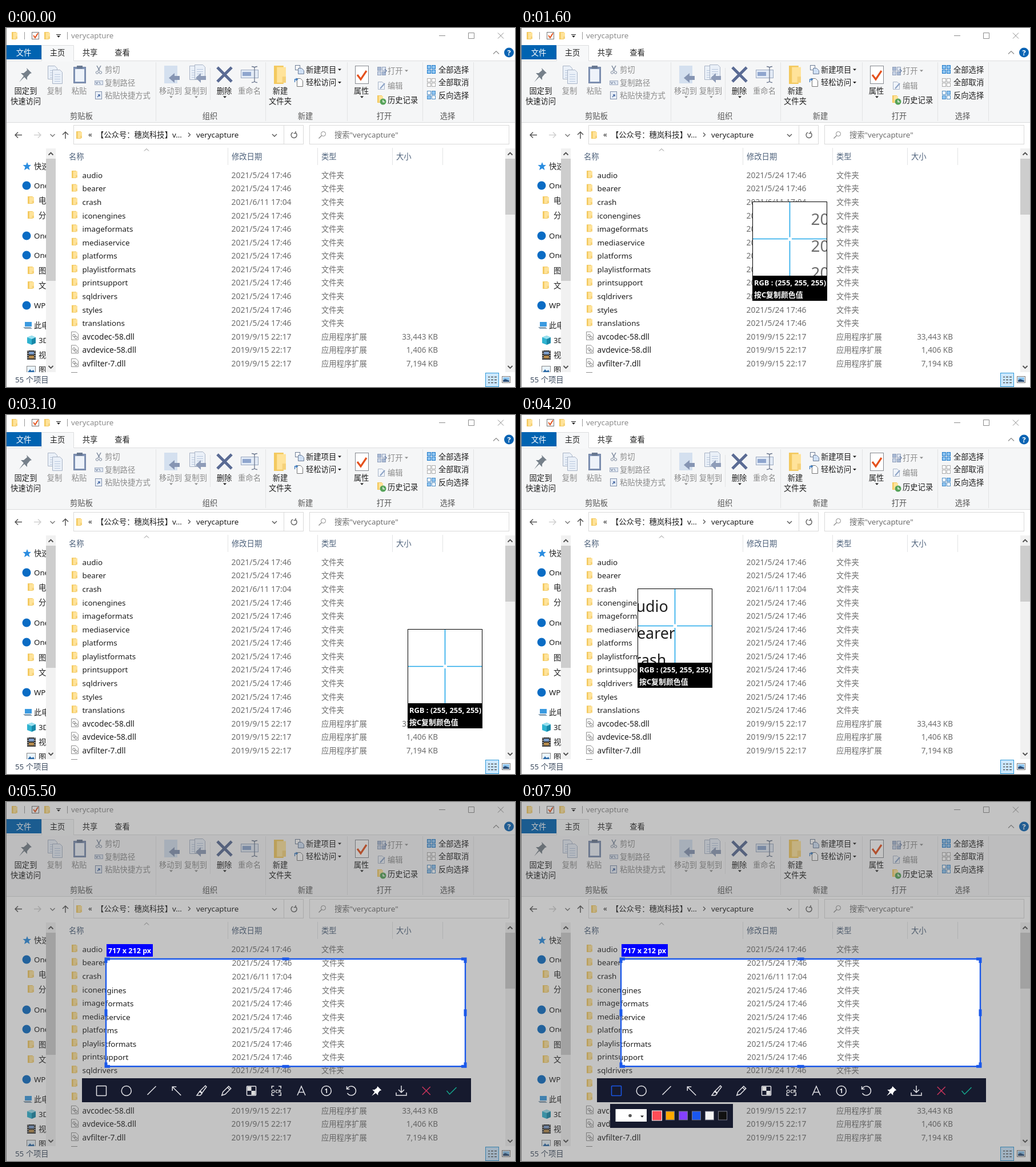
An HTML page that plays this animation: 891x629 px, repeating every 8000 ms.

```html
<!DOCTYPE html>
<html lang="zh-CN">
<head>
<meta charset="utf-8">
<style>
html, body { margin: 0; width: 100%; height: 100%; overflow: hidden; background: #fff; }
#stage { display: block; width: 891px; height: 629px; }
text { font: 13.3px "Noto Sans", "Noto Sans CJK SC", "Noto Sans CJK", sans-serif; white-space: pre; }
.b { font-weight: 700; }
.off { display: none; }
</style>
</head>
<body>
<svg id="stage" viewBox="0 0 891 629" xmlns="http://www.w3.org/2000/svg"></svg>
<script>
const INK = '#1e1e1e', GREY = '#8c8c8c', MID = '#6d6d6d', STEEL = '#5a6b94', BLUE = '#1a58ea', NAVY = '#161a2e';

// Drawing helpers; text is placed by its vertical centre.
const text = (x, y, s, fill = INK, anchor = 'start', size = 13.3, cls = '') =>
  `<text x="${x}" y="${y + 4.8}" fill="${fill}" text-anchor="${anchor}" style="font-size:${size}px" class="${cls}">${s}</text>`;
const mid = (x, y, s, fill) => text(x, y, s, fill, 'middle');
const rect = (x, y, w, h, fill, stroke = 'none') =>
  `<rect x="${x}" y="${y}" width="${w}" height="${h}" fill="${fill}" stroke="${stroke}"/>`;
const line = (d, stroke = GREY, w = 1, fill = 'none') =>
  `<path d="${d}" stroke="${stroke}" stroke-width="${w}" fill="${fill}"/>`;
const shape = (d, fill) => `<path d="${d}" fill="${fill}"/>`;
const disc = (x, y, r, fill, stroke = 'none') =>
  `<circle cx="${x}" cy="${y}" r="${r}" fill="${fill}" stroke="${stroke}"/>`;
const caret = (x, y, fill = INK) => shape(`M${x - 3} ${y - 1.5}h6l-3 3.2z`, fill);
const chevron = (x, y, dir, stroke = '#555', w = 1.4) =>
  line(`M${x - 4} ${y - 2 * dir}l4 ${4 * dir}l4 ${-4 * dir}`, stroke, w);
const vline = (x, y1, y2, c = '#e2e3e4') => line(`M${x + .5} ${y1}V${y2}`, c);
const folder = (x, y, w = 10, h = 13) =>
  rect(x, y, w * .8, h, '#f3c95f') + rect(x + w * .25, y + h * .08, w * .75, h * .85, '#ffe39a') +
  rect(x + w * .7, y + h * .6, w * .3, h * .33, '#f6d27a');
const page = (x, y, w, h, fill = '#fff', stroke = '#a9b4c6') =>
  line(`M${x + .5} ${y + .5}h${w - 5}l4 4v${h - 5}h${1 - w}z`, stroke, 1, fill);
const sheet = (x, y, w, h) => page(x, y, w, h, '#eaf0f8') +
  [0, 1, 2, 3].map(i => line(`M${x + 4} ${y + 8.5 + i * 4}h${w - 8}`, '#b9c8de')).join('');
const tiles = (x, y, fills, stroke) =>
  fills.map((f, i) => rect(x + (i % 2) * 8 + .5, y + (i >> 1) * 8 + .5, 6, 6, f, stroke)).join('');

function titleBar() {
  return folder(10, 7) + vline(32, 7, 20, '#999') +
    rect(45.5, 7.5, 12, 12, '#fff', '#777') + line('M48 13l3 4l5-8', '#e2531f', 2) +
    folder(67, 7) + line('M88 11.5h8', INK) + caret(92, 15) + vline(107, 7, 20, '#999') +
    text(114, 13.5, 'verycapture', GREY) +
    line('M758 13.5h11M809.5 8.5h10v10h-10zM861 8.500l10 10m0-10l-10 10');
}

function tabs() {
  return rect(1, 57, 890, 108, '#f5f6f7') + line('M0 57.500H62.500V30.500H118.500V57.500H891', '#dcdddf') +
    rect(63, 31, 55, 28, '#f7f8f9') + line('M0 165.500H891', '#dadbdc') +
    rect(0, 30, 62, 25, '#0063b1') + mid(31, 43, '文件', '#fff') +
    mid(90, 43, '主页') + mid(147, 43, '共享') + mid(203.500, 43, '查看') +
    line('M853 45.500l5-5l5 5', GREY, 1.2) + disc(880.500, 43, 8.500, '#0a64b4') +
    text(880.500, 43, '?', '#fff', 'middle', 13, 'b');
}

function ribbon() {
  let s = [262, 454, 597, 729, 818].map(x => vline(x, 60, 163)).join('') + vline(357, 70, 126);
  for (const [x, n] of [[132, '剪贴板'], [357, '组织'], [524, '新建'], [662, '打开'], [773, '选择']])
    s += mid(x, 154, n, '#555');
  for (const [x, y, n, c] of [
    [34.500, 110, '固定到'], [34.500, 128, '快速访问'], [85, 110, '复制', GREY], [128, 110, '粘贴', GREY],
    [288, 110, '移动到', GREY], [332, 110, '复制到', GREY], [382, 110, '删除'], [426, 110, '重命名', GREY],
    [480, 110, '新建'], [480, 128, '文件夹'], [622, 110, '属性']]) s += mid(x, y, n, c);
  for (const [x, y, n, c] of [
    [173, 73, '剪切', GREY], [173, 96, '复制路径', GREY], [173, 118, '粘贴快捷方式', GREY],
    [525, 73, '新建项目'], [525, 95.500, '轻松访问'], [668, 75, '打开', GREY], [668, 101, '编辑', GREY],
    [668, 126, '历史记录'], [757, 73, '全部选择'], [757, 95.500, '全部取消'], [757, 118, '反向选择']])
    s += text(x, y, n, c);
  for (const [x, y, c] of [[289, 121, GREY], [333, 121, GREY], [383, 121], [623, 121], [584, 73], [584, 95.500], [701, 75, GREY]])
    s += caret(x, y, c);
  // clipboard group
  s += shape('M36 70l9 9l-3 1l-5 6v5l-5-5l-9 9l8-11l-5-5h5l6-5z', '#76808a');
  s += sheet(73, 66, 17, 24) + sheet(81, 73, 18, 25);
  s += rect(118.500, 68.500, 21, 28, '#8093b5', '#7182a3') + rect(121, 72, 16, 22, '#eef3fa') + rect(124, 66, 10, 5, '#687891');
  s += line('M159 66l5 9M166 66l-5 9', '#7b889d', 1.500) + disc(159.500, 78, 2.200, 'none', '#7b889d') + disc(165.500, 78, 2.200, 'none', '#7b889d');
  s += rect(155.500, 92.500, 14, 7, '#dfe7f2', '#9fabc0') + line('M157 94l2 4l2-4M163 94l2 4', '#6d7c97');
  s += rect(156.500, 111.500, 11, 13, '#e8eef7', '#7f8fab') + line('M160 121l4-4m-3 0h3v3', '#4e6fa8', 1.500);
  // organise group
  s += rect(277, 66, 23, 31, '#d4e0ef') + shape('M304 84v7h-9v5l-10-8.500l10-8.500v5z', '#8695b3');
  s += sheet(321, 66, 18, 25) + sheet(330, 64, 19, 26) + shape('M350 84v7h-9v5l-9-8.500l9-8.500v5z', '#8e9cb8');
  s += line('M370 69l25 25m0-25l-25 25', STEEL, 5);
  s += rect(411.500, 73.500, 30, 14, '#e3ebf6', '#9aa8c0') + rect(414, 77, 15, 7, '#8fa6ce') + line('M430 67.500q4 0 5 2q1-2 5-2m-5 2v24m-5 2q4 0 5-2q1 2 5 2', '#707c92', 1.300);
  // new group
  s += folder(469, 66, 21, 32);
  s += rect(506.500, 65.500, 8, 8, '#fff', '#6d7d96') + page(511, 70, 11, 11, '#cfe0f5', '#6d7d96');
  s += page(509, 88, 11, 15, '#fff', '#777') + line('M505.500 95v-5h5m-3-2l3 2l-3 2', '#3b79bd', 1.300);
  // open group
  s += rect(611.500, 66.500, 23, 31, '#fff', '#85898f') + line('M615 82l6 8l10-15', '#e5511d', 3.200);
  s += tiles(650, 68, ['#a8b9d4', '#dfe7f2', '#c8d4e6', '#a8b9d4'], '#92a1bc') + line('M663 72l3 3l-3 3', '#6e83a8', 1.500);
  s += page(651, 94, 12, 14, '#f0f4fa') + line('M655 106l8-9', '#8ba2c5', 2);
  s += folder(650, 118, 10, 13) + disc(660, 129, 5.500, '#57a35a') + line('M660 126v3.500h3', '#fff', 1.300);
  // select group
  s += tiles(737, 65, Array(4).fill('#8ec5f2'), '#1e78c8') + tiles(737, 88, Array(4).fill('#fff'), '#aaa') +
    tiles(737, 110, ['#fff', '#8ec5f2', '#8ec5f2', '#fff'], '#4b8cc4');
  return s;
}

function addressBar() {
  return line('M28 187.500H16m5-5l-5 5l5 5', '#555', 1.500) + line('M49 187.500H61m-5-5l5 5l-5 5', '#d0d0d0', 1.500) +
    chevron(81.500, 188, 1, '#777') + line('M104 194V182m-5 5l5-5l5 5', '#555', 1.500) +
    rect(118.500, 170.500, 402, 33, '#fff', '#d9d9d9') + vline(486, 171, 203, '#d9d9d9') +
    folder(123, 181) + text(144, 186, '«') + text(158, 187.500, '【公众号：穗岚科技】v...') +
    line('M319 183.500l3.500 3.500l-3.500 3.500', '#555', 1.300) + text(333, 187.500, 'verycapture') +
    chevron(470, 188, 1) + line('M507 183.500a5 5 0 1 1-5-.5m5-2v3.500h-3.500', '#666', 1.500) +
    rect(531.500, 170.500, 349, 33, '#fff', '#d9d9d9') + disc(555.500, 185.500, 4, 'none', '#888') + line('M552.500 188.500l-5 5', '#888', 1.300) +
    text(575, 187.500, '搜索"verycapture"', MID);
}

function sideBar() {
  const cloud = y => disc(36, y, 7.500, '#0a6cc4');
  const dir = y => folder(38, y - 7, 11, 13);
  const pic = y => rect(36.500, y - 6.500, 15, 12, '#eaf4fb', '#888') + shape(`M38 ${y + 4}l4-5l3 3l3-2l2 4z`, '#2f6ca8');
  const star = y => shape(`M37 ${y - 7}l2 5h5l-4 3.500l1.500 5.500l-4.500-3l-5 3l1.500-5.500l-4-3.500h5.500z`, '#2b8de0');
  const monitor = y => rect(33, y - 6, 12, 8, '#3a9ae0') + shape(`M30 ${y + 3}h13l3 3h-13z`, '#8aa1b3');
  const cube = y => shape(`M37 ${y - 5}l8-3l7 3v10l-7 3l-8-3z`, '#2fb3d0') + shape(`M45 ${y - 2}l7-3v10l-7 3z`, '#1788a8') + shape(`M37 ${y - 5}l8-3l7 3l-7 3z`, '#9be0ef');
  const film = y => rect(37, y - 8, 15, 16, '#333') + rect(40, y - 6, 9, 5, '#7a9bc8') + rect(40, y + 1, 9, 5, '#b58a4c') +
    line(`M38.500 ${y - 8}v16M50.500 ${y - 8}v16`, '#ddd', 1.200).replace('/>', ' stroke-dasharray="2 2"/>');
  const items = [[242, star, 49, '快速访问'], [276, cloud, 49, 'One'], [302, dir, 57, '电'], [328, dir, 57, '分'],
    [364, cloud, 49, 'One'], [398, cloud, 49, 'One'], [425, dir, 57, '图'], [451, dir, 57, '文'],
    [486, cloud, 49, 'WP'], [521, monitor, 49, '此电脑'], [547, cube, 57, '3D'], [573, film, 57, '视'], [599, pic, 57, '图']];
  return `<svg width="70" height="603">${items.map(([y, icon, x, n]) => icon(y) + text(x, y, n)).join('')}</svg>`;
}

const scrollBar = (x, thumb) => rect(x, 211, 17, 392, '#f1f1f1') + rect(x, 229, 17, thumb, '#cdcdcd') +
  chevron(x + 8.500, 220.500, -1, '#505050', 1.800) + chevron(x + 8.500, 594, 1, '#505050', 1.800);

function fileList() {
  let s = [388, 545, 676, 764].map(x => vline(x, 210, 240)).join('') + line('M242 215.500l4-4l4 4', '#888');
  for (const [x, n] of [[110, '名称'], [395, '修改日期'], [552, '类型'], [683, '大小']]) s += text(x, 225, n, '#4c607a');
  const dirs = 'audio bearer crash iconengines imageformats mediaservice platforms playlistformats printsupport sqldrivers styles translations'.split(' ');
  const dlls = [['avcodec-58.dll', '33,443 KB'], ['avdevice-58.dll', '1,406 KB'], ['avfilter-7.dll', '7,194 KB']];
  const row = i => 258 + i * 23.570;
  const date = (y, d) => text(394.500, y, d, MID, 'start', 13.9);
  dirs.forEach((n, i) => {
    const y = row(i);
    s += folder(115, y - 8) + text(133.500, y, n, INK, 'start', 13.4) +
      date(y, n === 'crash' ? '2021/6/11 17:04' : '2021/5/24 17:46') + text(552, y, '文件夹', MID);
  });
  dlls.forEach(([n, size], i) => {
    const y = row(dirs.length + i);
    s += page(114, y - 9, 13, 15, '#fff', '#8f8f8f') + disc(119, y - 2, 2.200, 'none', '#777') + disc(122.500, y + 1.500, 2.200, 'none', '#777') +
      text(133.500, y, n, INK, 'start', 13.7) + date(y, '2019/9/15 22:17') +
      text(552, y, '应用程序扩展', MID) + text(756, y, size, MID, 'end', 13.5);
  });
  return s + line('M114 603.500h11', '#8f8f8f');
}

function statusBar() {
  return text(16, 616, '55 个项目', '#3b4a5e') + rect(839.500, 604.500, 23, 24, '#cce8ff', '#2f9ad8') +
    [611, 616, 621].map(y => line(`M844 ${y + .5}h3m2 0h4m2 0h4`, '#555', 1.500)).join('') +
    rect(868.500, 610.500, 14, 11, '#fff', '#777') + rect(870, 612, 11, 8, '#8cc4ee') + shape('M870 620v-3l4-2l7 3v2z', '#2d4f78');
}

const toolIcons = [
  '<rect id="box" x="-8.500" y="-8.500" width="17" height="17" rx="1"/>', '<circle r="8.500"/>', '<path d="M-7 7L8-8"/>',
  '<path d="M8 8L-7-7m0 7v-7h7"/>', '<path d="M-8 8h6l3-3l-4-4zM-2 0l3 4l8-11l-2-2z"/>',
  '<path d="M-8 8l2-6l10-10l4 4l-10 10zM2-6l4 4"/>',
  '<rect x="-8" y="-8" width="16" height="16" rx="1"/><path d="M-7-7h7v7h-7zM0 0h7v7h-7z" fill="#ddd" stroke="none"/>',
  '<path d="M-8-4v-4h4M4-8h4v4M8 4v4h-4M-4 8h-4v-4"/><text y="3.500" text-anchor="middle" class="b" style="font-size:8.500px" fill="#ddd" stroke="none">OCR</text>',
  '<path d="M-7 8L0-8L7 8M-4.500 2.500h9"/>',
  '<circle r="8.500"/><text y="4" text-anchor="middle" class="b" style="font-size:11px" fill="#eee" stroke="none">1</text>',
  '<path d="M-7-4a8 8 0 1 1 0 8M-8-8v5h5"/>', '<path d="M2-8l7 7l-3 1l-3 4v4l-4-4l-7 5l5-7l-4-4h4l4-3z" fill="#fff" stroke="none"/>',
  '<path d="M0-9V3m-5-5l5 5l5-5M-9 3v5h18v-5"/>', '<path d="M-7-7l14 14m0-14l-14 14" stroke="#c9345c"/>',
  '<path d="M-8 0l5 6L9-6" stroke="#15a58c"/>'];

const toolBar = () => rect(133, 484, 681, 42, NAVY) + '<g fill="none" stroke="#e4e4e8" stroke-width="1.5">' +
  toolIcons.map((d, i) => `<g transform="translate(${167 + i * 43.750} 506)">${d}</g>`).join('') + '</g>';

const panel = () => rect(156, 529, 215, 42, NAVY) + rect(165.500, 538, 54.500, 22, '#fff') + disc(191, 549.500, 2.800, '#555') + caret(212, 551) +
  ['#ff4d57', '#ffa800', '#8440ff', '#1a57f0', '#f3f3f3', '#111'].map((c, i) => {
    const r = i ? 7.500 : 8.500;
    return rect(238 + i * 23 - r, 549.500 - r, 2 * r, 2 * r, c, i ? '#77798a' : '#fff');
  }).join('');

const stage = document.getElementById('stage');
stage.innerHTML = `
<g id="win">${rect(0, 0, 891, 629, '#fff')}${titleBar()}${tabs()}${ribbon()}${addressBar()}${sideBar()}
${scrollBar(70, 214)}${scrollBar(874, 98)}${fileList()}${statusBar()}${vline(0, 0, 629, '#8a8a8a')}</g>
<rect id="dim" width="891" height="629" fill="rgb(80,80,80)" fill-opacity=".34"/>
<g id="sel">
  <svg id="cut" x="175" y="275"><use href="#win"/></svg>
  <path id="edge" fill="none" stroke="${BLUE}" stroke-width="2.4"/>
  <path id="grips" fill="none" stroke="${BLUE}" stroke-width="5"/>
  ${rect(176, 249, 81, 22, '#00f')}${text(216.500, 260, '', '#fff', 'middle', 12.600, 'b size')}
</g>
<g id="mag">
  ${rect(0, 0, 131, 131, '#fff')}
  <svg id="lens" width="131" height="131"><use href="#win"/></svg>
  ${line('M65.500 0V62.500M65.500 69V131M0 65.500H62.500M69 65.500H131', '#22a8ea', 1.600)}
  ${rect(.5, .5, 130, 173, 'none', '#000')}${rect(0, 130, 131, 44, '#000')}
  <g id="rgb">${text(3, 142.500, 'RGB : (255, 255, 255)', '#fff', 'start', 12.900, 'b')}</g>
  <g id="hint">${text(3, 163, '按C复制颜色值', '#fff', 'start', 12.900, 'b')}</g>
</g>
<g id="tools">${toolBar()}</g>
<g id="panel">${panel()}</g>
<g id="tip">${rect(.5, 521.500, 43, 25, '#fff', '#888')}${text(22, 534, '', '#444', 'middle', 13, 'name')}</g>`;

const $ = id => document.getElementById(id);
const show = (id, on) => $(id).classList.toggle('off', !on);
const set = (id, k, v) => $(id).setAttribute(k, v);

const PRESS = 4300, RELEASE = 5500, X0 = 175, Y0 = 275;
// Pointer path: time, x, y
const path = [[1300, 520, 300], [1600, 376, 275], [2100, 187, 62], [2300, 146, 150], [2500, 202, 228],
  [3000, 668, 339], [3100, 674, 346], [3400, 480, 430], [3800, 102, 430], [4200, X0, Y0], [PRESS, X0, Y0],
  [4500, 529.4, 417.9], [4700, 690, 450], [4900, 790, 462], [5000, 804, 463.3]];

function pointer(t) {
  const i = path.findIndex(k => k[0] > t);
  if (i < 1) return path[i ? path.length - 1 : 0].slice(1);
  const [a, b] = [path[i - 1], path[i]], u = (t - a[0]) / (b[0] - a[0]);
  return [a[1] + (b[1] - a[1]) * u, a[2] + (b[2] - a[2]) * u];
}

function drawSelection(t) {
  const [X, Y] = pointer(t), w = X - X0, h = Y - Y0, mx = X0 + w / 2, my = Y0 + h / 2;
  set('cut', 'width', w);
  set('cut', 'height', h);
  set('cut', 'viewBox', `${X0 - 1} ${Y0 - 1} ${w} ${h}`);
  set('edge', 'd', `M${X0} ${Y0}H${X}V${Y}H${X0}z`);
  set('grips', 'd', `M${X0} ${Y0 + 7}v-7h7M${X - 7} ${Y0}h7v7M${X} ${Y - 7}v7h-7M${X0 + 7} ${Y}h-7v-7` +
    `M${mx - 6} ${Y0}h12M${mx - 6} ${Y}h12M${X0} ${my - 6}v12M${X} ${my - 6}v12`);
  const px = d => Math.max(0, Math.round((d - 3.5) * 1.147));
  stage.querySelector('.size').textContent = `${px(w)} x ${px(h)} px`;
}

function drawMagnifier(t, drag) {
  const [x, y] = pointer(drag ? t - 10 : t).map(Math.round), gap = drag ? 6 : 29;
  set('mag', 'transform', `translate(${x + gap} ${y + gap})`);
  set('lens', 'viewBox', `${x - 32.75} ${y - 32.75} 65.5 65.5`);
  set('rgb', 'transform', `translate(0 ${drag ? 9.5 : 0})`);
  show('hint', !drag);
}

function draw(t) {
  const drag = t >= PRESS, mag = t >= 1300 && t < RELEASE, tip = t >= 7200 && t < 7800;
  show('dim', drag || (t >= 1100 && t < 1300));
  show('sel', drag);
  show('mag', mag);
  show('tools', t >= RELEASE);
  show('panel', t >= 7900);
  show('tip', tip);
  if (drag) drawSelection(t);
  if (mag) drawMagnifier(t, drag);
  set('box', 'stroke', t >= 7800 ? BLUE : '#e4e4e8');
  if (tip) {
    const round = t < 7600;
    set('tip', 'transform', `translate(${round ? 205 : 165} 0)`);
    stage.querySelector('.name').textContent = round ? '椭圆' : '矩形';
  }
}

const start = performance.now();
let last = -1;
function tick() {
  const t = Math.floor(((performance.now() - start) % 8000) / 100) * 100;
  if (t !== last) draw(last = t);
  requestAnimationFrame(tick);
}
tick();
</script>
</body>
</html>
```
